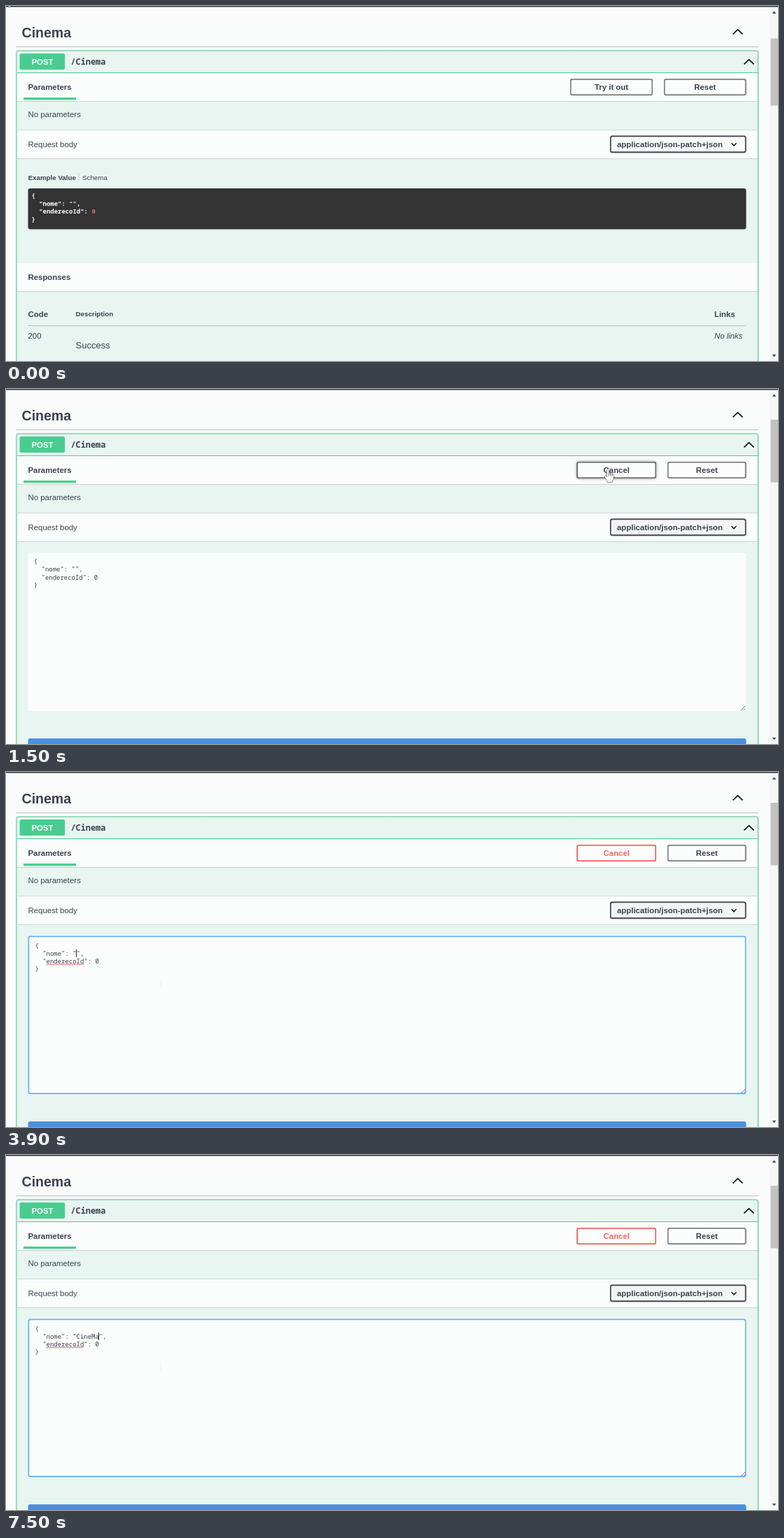
Recreate the animation shown at these times as an HTML page with a canvas. Size 1103 by 508 pixels, loop 8000 ms.

```html
<!DOCTYPE html>
<html lang="en">
<head>
<meta charset="utf-8">
<title>API console</title>
<style>
html, body { margin: 0; width: 100%; height: 100%; overflow: hidden; background: #fafcfb; }
canvas { display: block; width: 1103px; height: 508px; }
</style>
</head>
<body>
<canvas id="stage" width="1103" height="508"></canvas>
<script>
const ctx = document.getElementById('stage').getContext('2d');
const W = 1103, H = 508, LOOP = 8000, STEP = 100;
const SANS = '"Liberation Sans", Arial, sans-serif';
const MONO = '"Noto Sans Mono", "DejaVu Sans Mono", monospace';
const INK = '#3b4151', GREEN = '#49cc90', RED = '#ff6060', PANEL = '#e8f5f0', PALE = '#fafdfc';
const CHAR = 5.375, LINE = 11.25;

// [start time, typed value]
const TYPING = [
  [0, ''], [4000, 'C'], [4100, 'Ci'], [4600, 'Cin'], [4800, 'CinE'], [5200, 'Cin'],
  [5300, 'Cine'], [5700, 'CineM'], [5800, 'CineMA'], [6000, 'CineMAV'], [6100, 'CineMAVU'],
  [7200, 'CineMAV'], [7300, 'CineMA'], [7500, 'CineMa']
];

function rect(x, y, w, h, color) {
  ctx.fillStyle = color;
  ctx.fillRect(x, y, w, h);
}

function rounded(x, y, w, h, r) {
  ctx.beginPath();
  ctx.roundRect(x, y, w, h, r);
}

function fillBox(x, y, w, h, r, color) {
  rounded(x, y, w, h, r);
  ctx.fillStyle = color;
  ctx.fill();
}

// Border drawn inside the box
function border(x, y, w, h, r, width, color) {
  rounded(x + width / 2, y + width / 2, w - width, h - width, r);
  ctx.lineWidth = width;
  ctx.strokeStyle = color;
  ctx.stroke();
}

// Shadow that shows outside the box only
function shadow(x, y, w, h, r, dy, blur, alpha) {
  ctx.save();
  ctx.beginPath();
  ctx.rect(0, 0, W, H);
  ctx.roundRect(x, y, w, h, r);
  ctx.clip('evenodd');
  ctx.shadowColor = `rgba(0,0,0,${alpha})`;
  ctx.shadowBlur = blur;
  ctx.shadowOffsetY = dy;
  fillBox(x, y, w, h, r, '#000');
  ctx.restore();
}

function text(str, x, y, size = 11.4, style = 'bold', color = INK, align = 'left') {
  ctx.font = `${style} ${size}px ${SANS}`;
  ctx.fillStyle = color;
  ctx.textAlign = align;
  ctx.fillText(str, x, y);
}

function mono(str, x, y, color = INK, weight = 500, size = 8.96) {
  ctx.font = `${weight} ${size}px ${MONO}`;
  ctx.fillStyle = color;
  ctx.textAlign = 'left';
  ctx.fillText(str, x, y);
}

function line(points, width, color) {
  ctx.beginPath();
  points.forEach(([x, y]) => ctx.lineTo(x, y));
  ctx.lineWidth = width;
  ctx.strokeStyle = color;
  ctx.stroke();
}

function chevron(x, y, rx, ry, width) {
  line([[x - rx, y + ry], [x, y - ry], [x + rx, y + ry]], width, '#111');
}

function triangle(x, y, ry) {
  ctx.beginPath();
  ctx.moveTo(x - 3, y + ry);
  ctx.lineTo(x + 3, y + ry);
  ctx.lineTo(x, y - ry);
  ctx.fillStyle = '#505050';
  ctx.fill();
}

function mix(a, b, k) {
  return `rgb(${a.map((v, i) => Math.round(v + (b[i] - v) * k)).join(',')})`;
}

function button(label, x, w, hover = 0, edge = '#808080', color = INK) {
  shadow(x, 104, w, 24, 3, 0.8, 1.6, 0.1);
  if (hover) shadow(x, 104, w, 24, 3, 0, 4.5, 0.4 * hover);
  border(x, 104, w, 24, 2.5, 1.65, edge);
  text(label, x + w / 2, 120, 11.4, 'bold', color, 'center');
}

function sectionHead(y, h) {
  shadow(16, y, 1058, h, 0, 0.8, 1.6, 0.16);
  rect(16, y, 1058, h, PALE);
}

function scrollbar(top, bottom) {
  rect(1091.5, 2, 11.5, H - 2, '#f6f8f7');
  rect(1092.5, top, 10.5, bottom - top, '#c1c1c1');
  triangle(1097.5, 9, -0 + 1.7);
  triangle(1097.5, 500.5, -1.7);
}

function page(editing) {
  rect(0, 0, W, H, '#fafcfb');
  rect(0, 0, W, 1.4, '#2c2e30');
  text('Cinema', 22.6, 44.5, 19.5);
  chevron(1045.5, 37, 7, 3.4, 1.7);
  rect(14, 58, 1061, 1, '#bcc0c2');

  shadow(15, 64, 1060, 460, 3, 0, 2.4, 0.19);
  fillBox(15, 64, 1060, 460, 3, PANEL);
  fillBox(19.5, 68, 64.7, 23, 2.5, GREEN);
  text('POST', 52, 83.5, 11.4, 'bold', '#fff', 'center');
  mono('/Cinema', 92.4, 83.8, INK, 700, 11.9);
  chevron(1061.5, 80, 7, 3.4, 1.7);

  sectionHead(96, 40.5);
  rect(16, 95, 1058, 1, GREEN);
  text('Parameters', 31.5, 120);
  rect(25, 131, 75, 3.3, GREEN);
  text('No parameters', 31.5, 159, 11.4, 'normal');
  sectionHead(177.5, 41);
  text('Request body', 31.5, 202, 11.4, 'normal');

  shadow(863, 185.5, 194.5, 24.5, 3, 0.8, 1.6, 0.25);
  fillBox(863, 185.5, 194.5, 24.5, 3, editing ? '#f3f5f4' : '#f9fbfa');
  border(863, 185.5, 194.5, 24.5, 2.5, 1.65, '#41444e');
  text('application/json-patch+json', 873, 202);
  chevron(1040, 198, 3.5, -1.8, 1.5);
}

function example() {
  text('Example Value', 31.5, 249, 9.77);
  rect(103.5, 239.5, 1, 11, '#c5cfcb');
  text('Schema', 109, 249, 9.77, 'normal');

  fillBox(31.5, 261, 1026, 58.5, 3.3, '#333');
  const put = (str, col, row, color = '#fff') =>
    mono(str, 36.4 + col * CHAR, 274.3 + row * LINE, color, 700);
  put('{', 0, 0);
  put('"nome":', 2, 1);
  put('""', 10, 1, '#a2fca2');
  put(',', 12, 1);
  put('"enderecoId":', 2, 2);
  put('0', 16, 2, '#d36363');
  put('}', 0, 3);

  sectionHead(368, 40.5);
  text('Responses', 31.5, 392);
  text('Code', 31.5, 444.5);
  text('Description', 99.5, 444, 9.77);
  text('Links', 1012, 444.5);
  rect(31.5, 457, 1026, 1, '#b3bebb');
  text('200', 31.5, 476.3, 11.4, 'normal');
  text('Success', 99.5, 490, 13, 'normal');
  text('No links', 1012, 476.3, 11.4, 'italic');
}

function squiggle(x, y, w) {
  const pts = [];
  for (let i = 0; i <= w; i += 0.5) pts.push([x + i, y + 0.8 * Math.sin(i * 1.9)]);
  line(pts, 0.9, '#e8403c');
}

function editor(t) {
  const focus = t >= 2900;
  const value = TYPING.filter(k => k[0] <= t).pop()[1];
  const x = focus ? 41.5 : 39.8, y = focus ? 251.7 : 250;

  fillBox(31.5, 234.5, 1026, 226.5, 3, '#fbfdfc');
  if (focus) border(31.5, 234.5, 1026, 226.5, 2.5, 1.65, '#61affe');
  ['{', `  "nome": "${value}",`, '  "enderecoId": 0', '}']
    .forEach((row, i) => mono(row, x, y + i * LINE));

  // Pale text pointer passing over the letters
  if (t >= 2400 && t < 2600) rect(t < 2500 ? 105 : 100, 252, 2, 14, '#fbfdfc');
  if (t >= 3000) {
    squiggle(x + 3 * CHAR, 275.4, 10 * CHAR);
    for (let i = 297; i < 311; i += 2) rect(221, i, 1, 1, '#e6eae8');
  }
  const blinkOff = (t >= 3300 && t < 3900) || (t >= 6600 && t < 7100);
  if (focus && !blinkOff) rect(Math.floor(x + (11 + value.length) * CHAR - 0.3), 254, 1, 11, '#222');

  for (const s of [6.5, 3]) line([[1056.5 - s, 460], [1056.5, 460 - s]], 0.9, '#666');
  fillBox(31.5, 500, 1026, 30, 3, '#4990e2');
}

function pointer(x, y, shape) {
  ctx.save();
  ctx.translate(x, y);
  ctx.lineJoin = 'round';
  ctx.lineWidth = 1;
  ctx.strokeStyle = '#111';
  ctx.fillStyle = '#fff';
  ctx.stroke(shape);
  ctx.fill(shape);
  ctx.restore();
}

const ARROW = new Path2D('M0 0V13.5L3.2 10.6L5.3 15.4L7.4 14.5L5.4 9.8H9.6Z');
const HAND = new Path2D('M-1.4 0.8Q0 -0.8 1.2 0.8V5.6Q2.6 4.6 3.7 6Q5 5.2 6.1 6.8Q7.6 6.3 8 8V12.5' +
  'Q7.6 15 6.4 16.2V18H-0.8V16.4L-4.7 11Q-5.4 9 -3.6 9L-1.4 10.8Z');
const FOLDS = new Path2D('M1.2 5.6V9M3.7 6V9.3M6.1 6.8V9.6');

function hand(x, y) {
  pointer(x, y, HAND);
  ctx.save();
  ctx.translate(x, y);
  ctx.lineWidth = 0.8;
  ctx.strokeStyle = '#222';
  ctx.stroke(FOLDS);
  ctx.restore();
}

function bezier(a, b, c, d, u) {
  const v = 1 - u;
  return a * v ** 3 + 3 * b * v * v * u + 3 * c * v * u * u + d * u ** 3;
}

function cursor(t) {
  if (t >= 1800) return;
  if (t >= 1700) return pointer(852, 147, ARROW);
  const u = Math.sin(Math.min(1, Math.max(0, (t - 100) / 800)) * Math.PI / 2);
  const x = bezier(-1, 420, 760, 860, u), y = bezier(-14, 249, 249, 115, u);
  if (y > 104 && y < 128 && x > 806) hand(x, y);
  else pointer(x, y, ARROW);
}

function draw(t) {
  const editing = t >= 1500;
  page(editing);
  if (editing) {
    const k = t < 1700 ? 0 : t < 1800 ? 0.35 : t < 1900 ? 0.85 : 1;
    button('Cancel', 815.5, 113.5, 1 - k,
      mix([118, 118, 118], [255, 96, 96], k), mix([59, 65, 81], [255, 96, 96], k));
    button('Reset', 945, 112.5);
    editor(t);
  } else {
    button('Try it out', 806, 118, Math.min(1, Math.max(0, (t - 800) / 400)));
    button('Reset', 940, 117.5);
    example();
  }
  border(14.5, 63.5, 1060.5, 460, 3, 1, GREEN);
  if (editing) scrollbar(44, 133.5);
  else scrollbar(46.5, 142.5);
  cursor(t);
}

const start = performance.now();
function tick() {
  const t = (performance.now() - start) % LOOP;
  draw(Math.floor(t / STEP) * STEP);
  requestAnimationFrame(tick);
}
tick();
</script>
</body>
</html>
```
